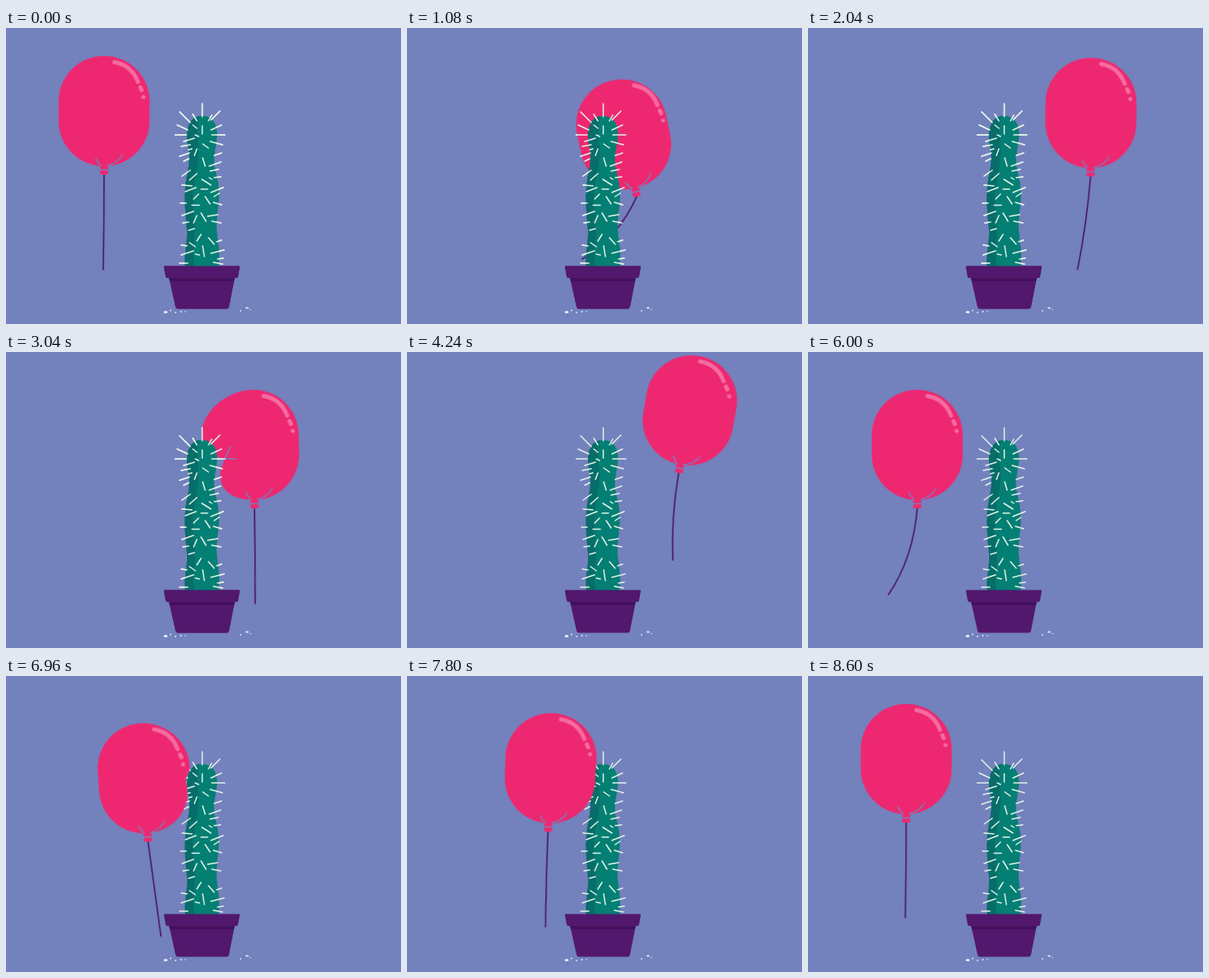
These frames come from a looping animation (480x360 px, 8640 ms). An HTML page without scripts:

```html
<!DOCTYPE html>
<html lang="en">
<head>
<meta charset="utf-8">
<title>Balloon and cactus</title>
<style>
html, body { margin: 0; width: 100%; height: 100%; overflow: hidden; background: #7381bd; }
svg { display: block; width: 100vw; height: 100vh; }

.line { fill: none; stroke-linecap: round; stroke-linejoin: round; }
.spines { stroke: #e2f2e8; stroke-width: 1.5; }
.string { stroke: #470f66; stroke-width: 1.6; }
.fold { stroke: #7381bd; stroke-width: 1.5; }
.shine { stroke: #f56ba0; stroke-width: 5; }
.balloon { fill: #ed2870; }

.drift, .bob, .lean, .string, .skin, .pinch-l, .pinch-r, .front {
  animation: 8640ms ease-in-out infinite;
}
.drift { animation-name: drift; }
.bob { animation-name: bob; }
.lean { animation-name: lean; }
.string { animation-name: string; }
.skin { animation-name: skin; }
.pinch-l { animation-name: pinch-l; }
.pinch-r { animation-name: pinch-r; }
.front { animation-name: front; animation-timing-function: step-end; }

@keyframes drift {
  0% { transform: translateX(119.2px); animation-timing-function: cubic-bezier(.22,0,.51,1); }
  25.46% { transform: translateX(345.5px); }
  36.11% { transform: translateX(300px); animation-timing-function: cubic-bezier(.2,0,.45,1); }
  50.93% { transform: translateX(344.5px); }
  71.3% { transform: translateX(129.3px); animation-timing-function: cubic-bezier(.44,0,.78,1); }
  85.19% { transform: translateX(190px); animation-timing-function: cubic-bezier(.45,0,.62,1); }
  100% { transform: translateX(119.2px); }
}
@keyframes bob {
  0% { transform: translateY(101px); }
  10.42% { transform: translateY(131px); }
  22.57% { transform: translateY(103px); }
  32.41% { transform: translateY(117px); animation-timing-function: cubic-bezier(.35,0,.4,1); }
  49.07% { transform: translateY(71px); }
  61.34% { transform: translateY(132px); }
  68.98% { transform: translateY(113px); }
  81.48% { transform: translateY(124.5px); animation-timing-function: cubic-bezier(.4,0,.5,1); }
  100% { transform: translateY(101px); }
}
@keyframes lean {
  0% { transform: rotate(0deg); }
  12.5% { transform: rotate(-12deg); }
  22% { transform: rotate(0deg); }
  30% { transform: rotate(4deg); }
  35.65% { transform: rotate(-1deg); }
  41.67% { transform: rotate(-4deg); }
  52.08% { transform: rotate(13deg); animation-timing-function: cubic-bezier(.6,0,.7,1); }
  69.44% { transform: rotate(0deg); }
  76.39% { transform: rotate(-7deg); }
  85.19% { transform: rotate(0deg); }
  92.6% { transform: rotate(3deg); }
  100% { transform: rotate(0deg); }
}
@keyframes string {
  0%, 100% { d: path("M0 77Q0 135 -1 193"); }
  6% { d: path("M0 77Q-4 135 -45 178"); }
  12.5% { d: path("M0 77Q-32 121 -81 138"); }
  22% { d: path("M0 77Q-6 135 -20 190"); }
  28% { d: path("M0 77Q5 135 12 191"); }
  35.2% { d: path("M0 77Q0 135 -1 193"); }
  41.67% { d: path("M0 77Q-6 130 -44 178"); }
  49.07% { d: path("M0 77Q0 130 11.5 183"); }
  56% { d: path("M0 77Q12 128 45 178"); }
  62.5% { d: path("M0 77Q24 121 62 152"); }
  69.44% { d: path("M0 77Q-5 138 -35 182"); }
  75% { d: path("M0 77Q4 136 0 191"); }
  80.56% { d: path("M0 77Q4 135 8 193"); }
  88% { d: path("M0 77Q0 135 2 193"); }
}
@keyframes skin {
  0%, 31.5%, 41%, 78.5%, 91%, 100% {
    d: path("M0 -67C30.5 -67 55.3 -42.5 55.3 -12C55.3 -8 55.3 -4 55.3 0C55.3 4 55.3 8 55.3 12C55.3 42.5 30.5 67 0 67C-30.5 67 -55.3 42.5 -55.3 12C-55.3 8 -55.3 4 -55.3 0C-55.3 -4 -55.3 -8 -55.3 -12C-55.3 -42.5 -30.5 -67 0 -67Z");
  }
  35.2%, 36.6% {
    d: path("M0 -67C30.5 -67 55.3 -42.5 55.3 -12C55.3 -8 55.3 -4 55.3 0C55.3 4 55.3 8 55.3 12C55.3 42.5 30.5 67 0 67C-24 67 -41 56 -41 37C-41 29 -38 22 -35 17C-45 15 -62.5 5 -62.5 -13C-62.5 -42 -30.5 -67 0 -67Z");
  }
  84.6%, 86% {
    d: path("M0 -67C30.5 -67 61 -42 61 -13C61 5 45 15 35 17C38 22 41 29 41 37C41 56 24 67 0 67C-30.5 67 -55.3 42.5 -55.3 12C-55.3 8 -55.3 4 -55.3 0C-55.3 -4 -55.3 -8 -55.3 -12C-55.3 -42.5 -30.5 -67 0 -67Z");
  }
}
@keyframes pinch-l { 0%, 33.5%, 38.5%, 100% { opacity: 0; } 35%, 37% { opacity: 1; } }
@keyframes pinch-r { 0%, 82.5%, 88%, 100% { opacity: 0; } 84.5%, 86.2% { opacity: 1; } }
/* passes behind the cactus going right, in front coming back */
@keyframes front { 0% { visibility: visible; } 48% { visibility: hidden; } 100% { visibility: hidden; } }
</style>
</head>
<body>
<svg viewBox="0 0 480 360">
  <defs>
    <path id="trunk" d="M218 291C216 272 221 262 220 245C218 225 216 205 219 185C222 168 225 160 221 142C217 120 225 107 238 107C252 107 258 119 256 135C254 150 251 160 254 172C257 185 260 195 258 215C256 232 255 240 257 255C259 270 260 280 258 291Z"/>
    <clipPath id="trunk-clip"><use href="#trunk"/></clipPath>
    <g id="plant">
      <use href="#trunk" fill="#047f73"/>
      <path clip-path="url(#trunk-clip)" fill="#076d68" d="M210 100H238C231 112 232 130 234 145C235 165 228 185 227 205C227 225 231 240 229 260Q227 275 229 291H210Z"/>
      <path class="line spines" d="M238.500 92V108M211 102L224 115M260 101L249 112M208 118L221 124M262 118L249 124M205.500 130H219M250 130H266M227 105L232 113M250 106L246 113M263 142L248 138M262 152L253 155M261 163L247 168M258 172L248 174M261 181L253 182M264 194L249 200M259 201L253 205M262 215L252 212M257 227L245 229M261 237L250 235M262 258L256 260M265 270L249 274M264 280L257 281M263 287L252 285"/>
      <path class="line spines" d="M216 138L229 134M213 144L224 142M211 156L223 152M216 162L222 159M214 180L224 173M214 191L226 192M218 199L231 194M212 213L219 213M214 228L228 223M215 237L222 236M213 264L220 265M213 276L228 271M211 286L221 286"/>
      <path class="line spines" d="M238.500 119V129M227 118L232 122M230 130L234 132M239 141L246 146M222 148L226 147M232 147L229 155M239 158L242 168M223 185L232 177M238 184L249 191M247 182L250 184M228 208L234 202M237 196H245M226 215.500H235M242 205L248 214M232 228L228 237M237 225L243 235M222 246L229 244M237 251L232 259M246 255L253 263M223 261L230 266M239 265L241 278M230 275L235 276"/>
      <path fill="#52186d" d="M198 303H278L271 339Q270.500 341.500 268 341.500H209Q206.500 341.500 206 339Z"/>
      <path fill="#44115f" d="M198 303H278L277 308H199Z"/>
      <path fill="#52186d" d="M193 289.500H283Q284.500 289.500 284 291L282 302Q281.500 304 280 304H196Q194.500 304 194 302L192 291Q191.500 289.500 193 289.500Z"/>
    </g>
  </defs>

  <g fill="#e6eaf6">
    <ellipse cx="194" cy="345.500" rx="2.500" ry="1.500"/>
    <circle cx="200" cy="343.500" r="1"/>
    <circle cx="206" cy="346" r=".9"/>
    <circle cx="212.500" cy="345" r="1"/>
    <circle cx="218" cy="345" r=".8"/>
    <circle cx="285" cy="344" r=".9"/>
    <ellipse cx="293" cy="340.500" rx="2" ry="1.100"/>
    <circle cx="297" cy="342.500" r=".8"/>
  </g>

  <use href="#plant"/>

  <g class="drift"><g class="bob">
    <g class="lean">
      <path class="line string" d="M0 77Q0 135 -1 193"/>
      <path class="balloon" d="M-6 64H6L4.500 71L5 76.500Q0 78.500 -5 76.500L-4.500 71Z"/>
      <path class="balloon skin" d="M0 -67C30.5 -67 55.3 -42.5 55.3 -12C55.3 -8 55.3 -4 55.3 0C55.3 4 55.3 8 55.3 12C55.3 42.5 30.5 67 0 67C-30.5 67 -55.3 42.5 -55.3 12C-55.3 8 -55.3 4 -55.3 0C-55.3 -4 -55.3 -8 -55.3 -12C-55.3 -42.5 -30.5 -67 0 -67Z"/>
      <path class="line fold" d="M-10 58Q-8 63 -4 66.500M22 53.500Q17 63 4 66.500M-4 71.500H4"/>
    </g>
    <path class="line fold pinch-l" d="M-28 2L-35 17H-21"/>
    <path class="line fold pinch-r" d="M28 2L35 17H21"/>
    <path class="line shine" d="M12.500 -59.500C27 -57 36 -49 41 -35.500M44 -29L45.500 -25.500M47.800 -17V-16.900"/>
  </g></g>

  <use class="front" href="#plant"/>
</svg>
</body>
</html>
```
